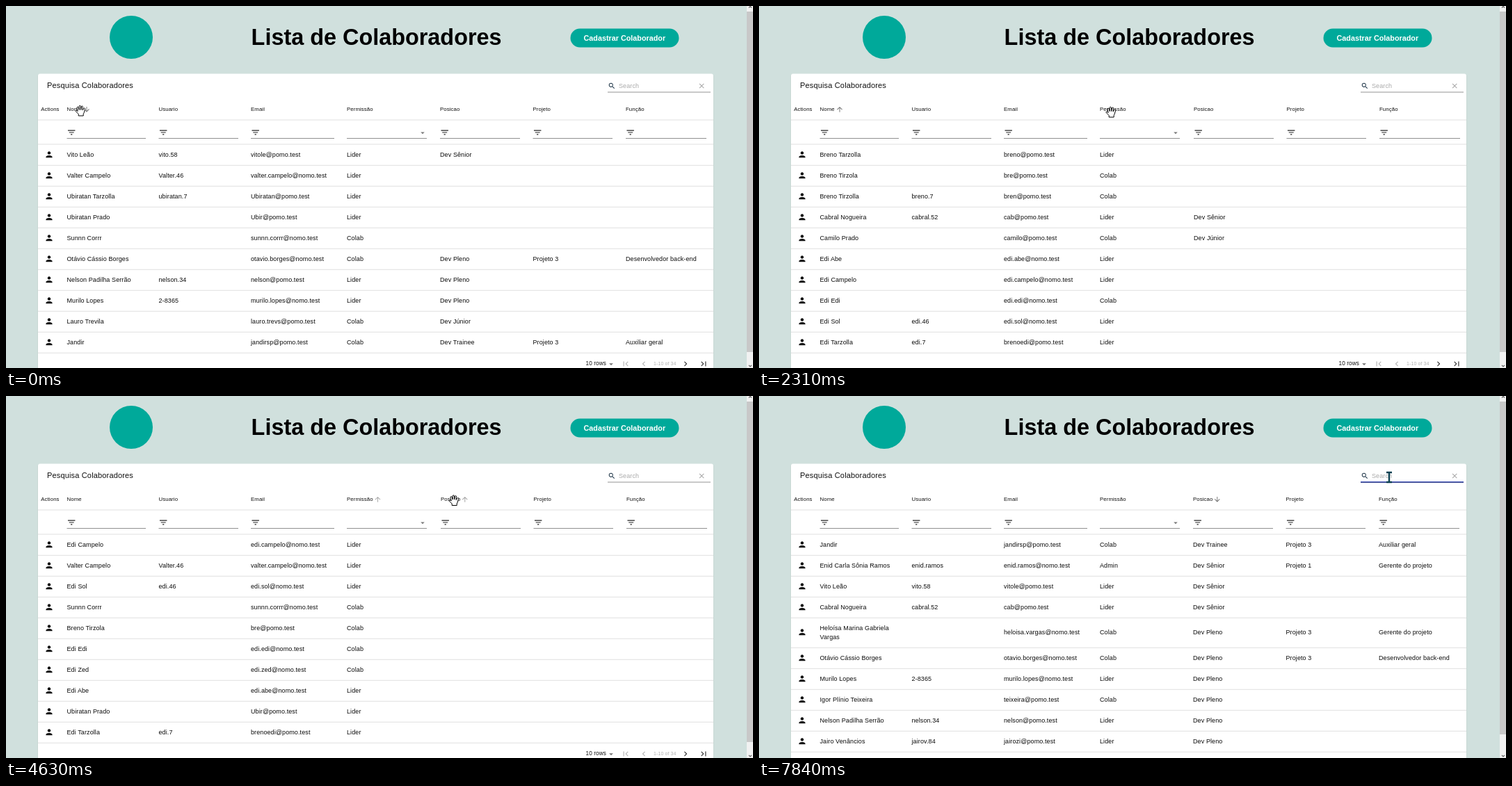
Write an HTML page that moves like this. It is 1074x521 px and loops after 8 s.

```html
<!DOCTYPE html>
<html lang="pt-BR">
<head>
<meta charset="utf-8">
<title>Lista de Colaboradores</title>
<style>
  html, body { margin: 0; width: 100%; height: 100%; overflow: hidden; background: #d0e0dd; }
  svg { display: block; width: 1074px; height: 521px; font-family: "Liberation Sans", Arial, sans-serif; }
  text { white-space: pre; }
  .cell { font-size: 9px; letter-spacing: .1px; fill: #0c0c0c; }
  .head { font-size: 7.8px; letter-spacing: .1px; fill: #111; }
  .bold { font-weight: bold; }
</style>
</head>
<body>
<svg id="stage" viewBox="0 0 1074 521"></svg>
<script>
const LOOP = 8000;
const stage = document.getElementById('stage');

function add(parent, tag, attrs, label) {
  const el = document.createElementNS('http://www.w3.org/2000/svg', tag);
  for (const k in attrs) el.setAttribute(k, attrs[k]);
  if (label) el.textContent = label;
  parent.appendChild(el);
  return el;
}
const rect = (p, x, y, width, height, fill, more) => add(p, 'rect', { x, y, width, height, fill, ...more });
const text = (p, x, y, label, cls, more) => add(p, 'text', { x, y, class: cls, ...more }, label);
const icon = (p, cx, cy, scale, d, fill) =>
  add(p, 'path', { d, fill, transform: `translate(${cx} ${cy}) scale(${scale}) translate(-12 -12)` });
const show = (el, on) => { el.style.display = on ? '' : 'none'; };

const ICON = {
  person: 'M12 12c2.21 0 4-1.79 4-4s-1.79-4-4-4-4 1.79-4 4 1.79 4 4 4zm0 2c-2.67 0-8 1.34-8 4v2h16v-2c0-2.66-5.33-4-8-4z',
  filter: 'M10 18h4v-2h-4v2zM3 6v2h18V6H3zm3 7h12v-2H6v2z',
  search: 'M15.5 14h-.8l-.3-.3A6.5 6.5 0 1 0 13.7 14.4l.3.3v.8l5 5 1.5-1.5zM9.5 14a4.5 4.5 0 1 1 0-9 4.5 4.5 0 0 1 0 9z',
  clear: 'M19 6.4 17.6 5 12 10.6 6.4 5 5 6.4 10.6 12 5 17.6 6.4 19 12 13.4 17.6 19 19 17.6 13.4 12z',
  down: 'M20 12l-1.41-1.41L13 16.17V4h-2v12.17l-5.58-5.59L4 12l8 8 8-8z',
  drop: 'M7 10l5 5 5-5z',
  prev: 'M15.4 7.4 14 6l-6 6 6 6 1.4-1.4L10.8 12z',
  next: 'M10 6 8.6 7.4 13.2 12l-4.6 4.6L10 18l6-6z',
  first: 'M18.4 16.6 13.8 12l4.6-4.6L17 6l-6 6 6 6zM6 6h2v12H6z',
  last: 'M5.6 7.4l4.6 4.6-4.6 4.6L7 18l6-6-6-6zM16 6h2v12h-2z'
};

const COL_X = [87.5, 219.5, 352, 490, 624, 757.5, 891];
const COL_END = [201, 334, 472, 605, 739, 872, 1007];
const TITLES = ['Nome', 'Usuario', 'Email', 'Permissão', 'Posicao', 'Projeto', 'Função'];

// name | user | mail | role | position | project | job ("/" breaks the name)
const PEOPLE = {
  vito: 'Vito Leão|vito.58|vitole@pomo.test|Lider|Dev Sênior',
  valter: 'Valter Campelo|Valter.46|valter.campelo@nomo.test|Lider',
  ubiT: 'Ubiratan Tarzolla|ubiratan.7|Ubiratan@pomo.test|Lider',
  ubiP: 'Ubiratan Prado||Ubir@pomo.test|Lider',
  sunnn: 'Sunnn Corrr||sunnn.corrr@nomo.test|Colab',
  otavio: 'Otávio Cássio Borges||otavio.borges@nomo.test|Colab|Dev Pleno|Projeto 3|Desenvolvedor back-end',
  nelson: 'Nelson Padilha Serrão|nelson.34|nelson@pomo.test|Lider|Dev Pleno',
  murilo: 'Murilo Lopes|2-8365|murilo.lopes@nomo.test|Lider|Dev Pleno',
  lauro: 'Lauro Trevila||lauro.trevs@pomo.test|Colab|Dev Júnior',
  jandir: 'Jandir||jandirsp@pomo.test|Colab|Dev Trainee|Projeto 3|Auxiliar geral',
  ediC: 'Edi Campelo||edi.campelo@nomo.test|Lider',
  ediS: 'Edi Sol|edi.46|edi.sol@nomo.test|Lider',
  gil: 'Gil Ort||gil.ort@nomo.test|Colab|Dev Júnior|Projeto 1|Assistente',
  heloisa: 'Heloísa Marina Gabriela/Vargas||heloisa.vargas@nomo.test|Colab|Dev Pleno|Projeto 3|Gerente do projeto',
  breno: 'Breno Tirzola||bre@pomo.test|Colab',
  gustav: 'Gustav Ivan Monteiro||gustav.monteiro@nomo.test|Colab|Dev Júnior|Projeto 3|DBA',
  brenoT: 'Breno Tarzolla||breno@pomo.test|Lider',
  brenoL: 'Breno Tirzolla|breno.7|bren@pomo.test|Colab',
  cabral: 'Cabral Nogueira|cabral.52|cab@pomo.test|Lider|Dev Sênior',
  camilo: 'Camilo Prado||camilo@pomo.test|Colab|Dev Júnior',
  ediA: 'Edi Abe||edi.abe@nomo.test|Lider',
  ediE: 'Edi Edi||edi.edi@nomo.test|Colab',
  ediT: 'Edi Tarzolla|edi.7|brenoedi@pomo.test|Lider',
  ediZ: 'Edi Zed||edi.zed@nomo.test|Colab',
  enid: 'Enid Carla Sônia Ramos|enid.ramos|enid.ramos@nomo.test|Admin|Dev Sênior|Projeto 1|Gerente do projeto',
  fabio: 'Fábio dos Campos|fabio.63|fabia@pomo.test|Admin|Dev Júnior',
  igor: 'Igor Plínio Teixeira||teixeira@pomo.test|Colab|Dev Pleno',
  jairo: 'Jairo Venâncios|jairov.84|jairozi@pomo.test|Lider|Dev Pleno'
};

// start time and row order; shift nudges the right-hand columns
const VIEWS = [
  { t: 0, rows: 'vito valter ubiT ubiP sunnn otavio nelson murilo lauro jandir' },
  { t: 400, rows: 'ediC valter ediS gil heloisa otavio sunnn breno murilo gustav' },
  { t: 1260, shift: 1, rows: 'brenoT breno brenoL cabral camilo ediA ediC ediE ediS ediT' },
  { t: 2890, rows: 'enid fabio gil heloisa otavio sunnn breno gustav ediE ediZ' },
  { t: 4550, shift: 1, rows: 'ediC valter ediS sunnn breno ediE ediZ ediA ubiP ediT' },
  { t: 5400, rows: 'jandir enid vito cabral heloisa otavio murilo igor nelson jairo' }
];

// Page header
add(stage, 'circle', { cx: 180, cy: 45, r: 31, fill: '#00a99a' });
text(stage, 352.6, 56, 'Lista de Colaboradores', 'bold', { 'font-size': 32.4 });
rect(stage, 811.5, 32.5, 156, 27, '#00a99a', { rx: 13.5 });
text(stage, 830.5, 50, 'Cadastrar Colaborador', 'bold', { 'font-size': 10.8, fill: '#fff' });

// Card
rect(stage, 45.5, 98, 972, 440, '#bfd0cc', { rx: 3 });
rect(stage, 46, 97.5, 971, 440, '#fff', { rx: 3 });
text(stage, 59, 118, 'Pesquisa Colaboradores', '', { 'font-size': 11, 'letter-spacing': .16, fill: '#111' });

// Search field
icon(stage, 871, 115, .48, ICON.search, '#1c3346');
text(stage, 881, 118, 'Search', 'cell', { style: 'fill:#a9a9a9' });
icon(stage, 1000.2, 115, .5, ICON.clear, '#a6a6a6');
rect(stage, 865, 123.5, 148, 1, '#949494');
const hoverLine = rect(stage, 865, 123, 148, 1.6, '#222');
const focusLine = rect(stage, 865, 123, 148, 1.6, '#3f51b5');
const caret = rect(stage, 881, 110, 1, 10, '#222');

// Column heads and filters
const left = add(stage, 'g', {}), right = add(stage, 'g', {});
text(left, 50.3, 151, 'Actions', 'head');
const heads = TITLES.map((title, i) => {
  const g = i > 3 ? right : left, x = COL_X[i];
  rect(g, x, 190, COL_END[i] - x, 1, '#8f8f8f');
  if (i === 3) icon(g, 599, 182.5, .55, ICON.drop, '#757575');
  else icon(g, x + 6.7, 182, .58, ICON.filter, '#222');
  return text(g, x, 151, title, 'head');
});
for (const y of [163.5, 198.5]) rect(stage, 46, y, 971, 1, '#e0e0e0');

function buildView(view) {
  const g = add(stage, 'g', {});
  let y = 199;
  for (const key of view.rows.split(' ')) {
    const cells = PEOPLE[key].split('|');
    const lines = cells[0].split('/');
    const h = lines.length > 1 ? 43 : 30;
    const mid = y + Math.floor(h / 2);
    icon(g, 62, mid - .2, .57, ICON.person, '#111');
    lines.forEach((line, i) => text(g, COL_X[0], y + 18 + i * 13, line, 'cell'));
    cells.slice(1).forEach((cell, i) => {
      if (cell) text(g, COL_X[i + 1] + (i > 2 ? view.shift || 0 : 0), mid + 3, cell, 'cell');
    });
    y += h;
    rect(g, 46, y - .2, 971, 1, '#e0e0e0');
  }
  const f = y + 16;
  text(g, 833.5, f + 2, '10 rows', 'head', { style: 'font-size:8.2px' });
  icon(g, 870, f + .5, .58, ICON.drop, '#757575');
  icon(g, 891, f, .58, ICON.first, '#b5b5b5');
  icon(g, 917, f, .58, ICON.prev, '#b5b5b5');
  text(g, 931, f + 2, '1-10 of 34', 'head', { style: 'fill:#b0b0b0;font-size:7px' });
  icon(g, 977, f, .58, ICON.next, '#333');
  icon(g, 1003, f, .58, ICON.last, '#333');
  view.el = g;
  view.thumb = y > 500 ? 479 : 490;
}
VIEWS.forEach(buildView);

// Scrollbar
rect(stage, 1065, 0, 9, 521, '#f1f1f1');
const thumb = rect(stage, 1065, 8, 9, 490, '#c8c8c8');
add(stage, 'path', { d: 'M1068 2.5l2-2 2 2M1068 517l2 2 2-2', fill: 'none', stroke: '#606060', 'stroke-width': 1.1 });

// Sort labels: [time, arrow opacity, arrow angle, label colour]
const DARK = '#111', GREY = '#999';
const SORTS = [
  { col: 0, x: 116, keys: [[0, 1, 0, DARK], [400, .5, 180, GREY], [1260, 1, 180, DARK], [2890, 0, 180, DARK]] },
  { col: 3, x: 534.5, keys: [[0, 0, 180, DARK], [2340, .5, 180, GREY], [2890, 1, 180, DARK], [4550, 0, 180, DARK]] },
  { col: 4, x: 658.8, keys: [[0, 0, 180, DARK], [3600, .5, 180, GREY], [4550, 1, 180, DARK], [5400, 1, 0, DARK]] }
];
for (const s of SORTS) {
  s.el = add(s.col > 3 ? right : left, 'g', {});
  icon(s.el, 0, 0, .48, ICON.down, '#757575');
}

// Pointers
const pointer = add(stage, 'g', {});
const hand = add(pointer, 'path', {
  d: 'M5 15.5V13L1 9Q.4 7.8 1.8 7.4L4 9 2.8 4.2Q2.8 2.7 4 2.7 4.9 2.7 5.2 4L6 7V2Q6 .8 7.1.8 8.2.8 8.2 2L8.5 7 9.2 2.4Q9.6 1.3 10.5 1.5 11.4 1.8 11.2 3L11 7.5 12.5 5Q13.1 4 14 4.5 14.8 5 14.4 6L13 11 12 13V15.5Z',
  fill: '#fff', stroke: '#000', 'stroke-width': 1, 'stroke-linejoin': 'round', transform: 'translate(-7.8 -8)'
});
const arrow = add(pointer, 'path', {
  d: 'M0 0V14.5L3.4 11.4 5.7 16.6 8 15.6 5.8 10.6H10.4Z', fill: '#fff', stroke: '#000', 'stroke-width': .9
});
const beam = add(pointer, 'path', {
  d: 'M-4-7H4M0-7V7M-4 7H4', fill: 'none', stroke: '#0c4052', 'stroke-width': 2.4
});

const PATH = [
  [0, 107, 150.5], [1800, 107, 150.5], [1950, 190, 164], [2100, 340, 172], [2240, 476, 161], [2310, 506, 152.5],
  [3080, 506, 152.5], [3280, 565, 166], [3500, 636, 164], [3620, 644, 150], [6220, 644, 150],
  [6350, 720, 147], [6480, 840, 128], [6600, 906, 117]
];
const LABELS = [[87, 121], [489, 540], [623, 664]];

const clamp = v => Math.max(0, Math.min(1, v));
const ease = v => { v = clamp(v); return v * v * (3 - 2 * v); };
const mix = (a, b, k) => a + (b - a) * k;
const lastIndex = (list, t, time) => list.reduce((n, item, i) => time(item) <= t ? i : n, 0);

function place(t) {
  const i = lastIndex(PATH, t, p => p[0]);
  const a = PATH[i], b = PATH[i + 1] || a;
  const k = b === a ? 0 : (t - a[0]) / (b[0] - a[0]);
  return [mix(a[1], b[1], k), mix(a[2], b[2], k)];
}

function draw(t) {
  const now = lastIndex(VIEWS, t, v => v.t);
  VIEWS.forEach((v, i) => show(v.el, i === now));
  thumb.setAttribute('height', VIEWS[now].thumb);
  right.setAttribute('transform', `translate(${VIEWS[now].shift || 0} 0)`);

  for (const s of SORTS) {
    const i = lastIndex(s.keys, t, k => k[0]);
    const key = s.keys[i], from = s.keys[i - 1] || key;
    const k = ease((t - key[0]) / 200);
    s.el.setAttribute('transform', `translate(${s.x} 148.8) rotate(${mix(from[2], key[2], k)})`);
    s.el.setAttribute('opacity', mix(from[1], key[1], k));
    heads[s.col].style.fill = key[3];
  }

  hoverLine.setAttribute('opacity', ease((t - 6540) / 180));
  const grow = ease((t - 7300) / 230);
  focusLine.setAttribute('x', 939 - 74 * grow);
  focusLine.setAttribute('width', 148 * grow);
  show(caret, t >= 7330 && t < 7840);

  const [x, y] = place(t);
  const onLabel = y < 157 && LABELS.some(([a, b]) => x >= a && x <= b);
  const onField = x > 878 && y < 126;
  pointer.setAttribute('transform', `translate(${x} ${y})`);
  show(hand, onLabel);
  show(beam, onField);
  show(arrow, !onLabel && !onField);
}

const start = performance.now();
function tick() {
  draw((performance.now() - start) % LOOP);
  requestAnimationFrame(tick);
}
tick();
</script>
</body>
</html>
```
